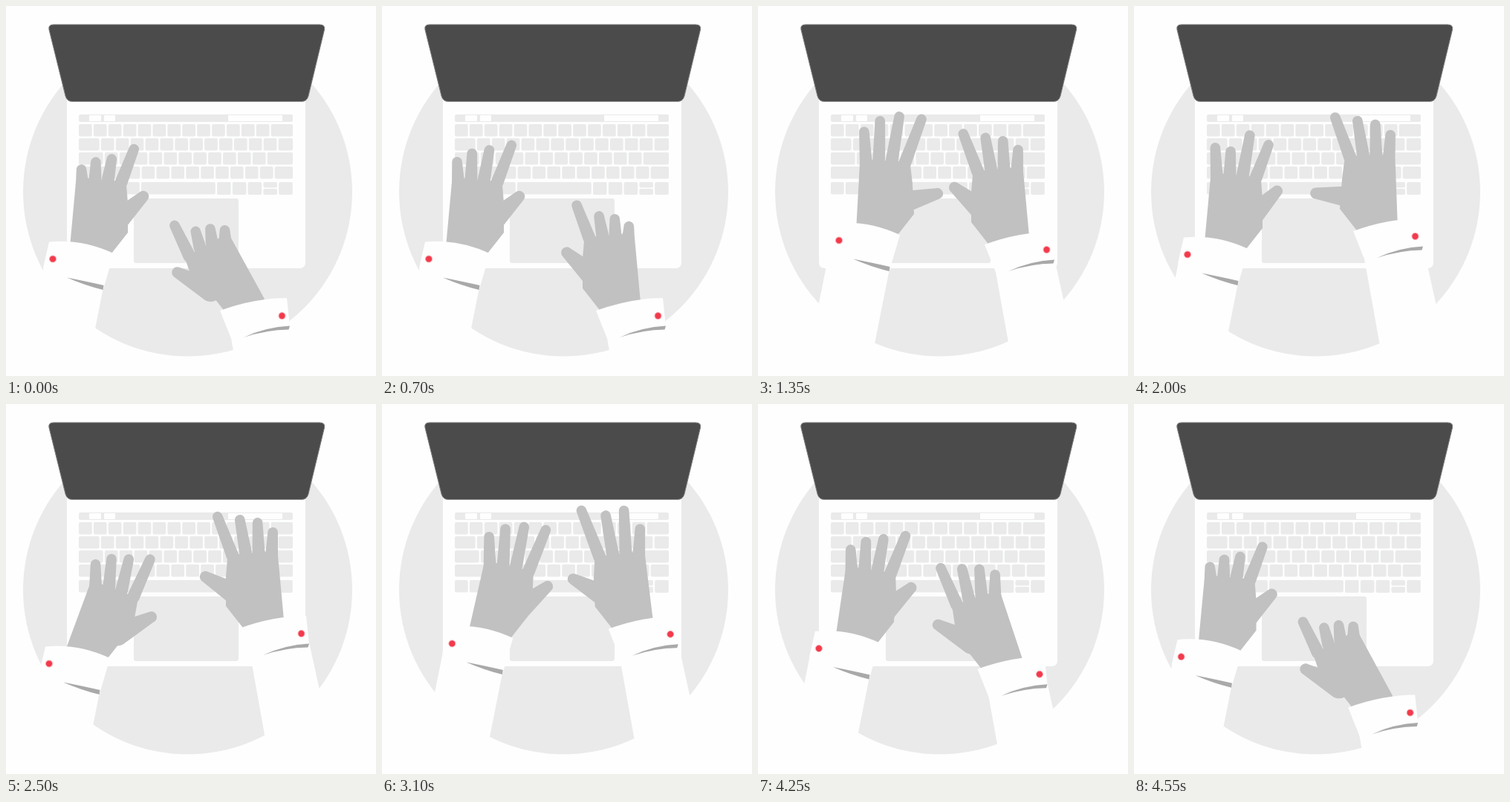
These frames come from a looping animation (498x498 px, 4.6 s). An HTML page:

```html
<!DOCTYPE html>
<html lang="en">
<head>
<meta charset="utf-8">
<title>Typing hands</title>
<style>
  html, body { margin: 0; width: 100%; height: 100%; overflow: hidden; background: #fdfefc; }
  svg { display: block; width: 100vw; height: 100vh; }
  .paper { fill: #fdfefd; }
  .grey { fill: #eaeaeb; }
  .skin { fill: #c1c1c1; }
  .shade { fill: #a9a9a9; }
  .button { fill: #f23a4c; stroke: #f9a9b1; stroke-width: 1; }
</style>
</head>
<body>
<svg viewBox="0 0 498 498">
  <rect class="paper" width="498" height="498"/>
  <circle class="grey" cx="244.5" cy="250" r="221.5"/>
  <path class="paper" d="M82 126H403V345Q403 353 395 353H90Q82 353 82 345Z"/>
  <path d="M64 25H422Q430 25 428.500 32L407 121Q405 128.500 398 128.500H89Q82 128.500 80 121L58 32Q56.500 25 64 25Z" fill="#4b4b4b" stroke="#7d7d7d" stroke-width="1"/>
  <g id="keys" class="grey"></g>
  <g class="paper">
    <rect x="112" y="147" width="16" height="8" rx="1"/>
    <rect x="132" y="147" width="15" height="8" rx="1"/>
    <rect x="299" y="147" width="73" height="8" rx="1"/>
  </g>
  <rect class="grey" x="172" y="259" width="141" height="87" rx="3"/>
  <g id="left">
    <g class="skin" transform="translate(114 325)"><path/><path/></g>
    <path class="paper" d="M51 350L131 379L83 620H-3Z"/>
    <path class="paper" d="M58 317.500Q102 313 145 333L131 381Q105 372 82 365L50 352Z"/>
    <path class="shade" d="M82 365.500Q110 371 131.500 376L130.500 382Q106 376 82 365.500Z"/>
    <circle class="button" cx="63" cy="340.500" r="4.500"/>
  </g>
  <g id="right">
    <g class="skin" transform="translate(320 400) scale(-1 1)"><path/><path/></g>
    <path class="paper" d="M303 447L382 429L424 620H334Z"/>
    <path class="paper" d="M288 410Q335 393 378 393L382 431Q340 434 304 450Z"/>
    <path class="shade" d="M320 446Q350 432 382 430.500L380.500 435.500Q350 436 320 446Z"/>
    <circle class="button" cx="371.500" cy="417" r="4.500"/>
  </g>
</svg>
<script>
const LOOP = 4600, TYPE_FROM = 1350, TYPE_TO = 3900;
const $ = s => document.querySelector(s);

// Keyboard: staggered rows, the last key fills each row
const PITCH = 19.9, LEFT = 98, RIGHT = 386;
let keys = '';
const key = (x, y, w, h = 16.5) =>
  keys += `<rect x="${x}" y="${y}" width="${w - 2.2}" height="${h}" rx="2"/>`;
key(LEFT, 146, RIGHT - LEFT + 2.2, 10);
[1, 1.5, 1.75, 2.25].forEach((first, row) => {
  const y = 159 + row * 19;
  let x = LEFT, w = first * PITCH;
  while (x + w + PITCH < RIGHT + 1) {
    key(x, y, w);
    x += w;
    w = PITCH;
  }
  key(x, y, RIGHT + 2.2 - x);
});
for (let i = 0; i < 3; i++) key(LEFT + i * PITCH, 237, PITCH);
key(158, 237, 24);
key(182, 237, 102);
for (let i = 0; i < 5; i++) {
  const x = 284 + i * 20.8;
  if (i === 3) { key(x, 237, 20.8, 7.5); key(x, 246, 20.8, 8); }
  else key(x, 237, 20.8, 17);
}
$('#keys').innerHTML = keys;

// Key poses: time, arm x, arm y, palm turn, finger reach, thumb angle.
// Hand shapes are relative to the wrist; the right hand is mirrored.
const hand = (id, beat, rest, lift, moves) => {
  const settled = moves[moves.length - 1];
  return {
    node: $(id), skin: $(id + ' .skin').children, beat,
    poses: [[0, ...rest], [700, ...lift], ...moves,
      [TYPE_TO, ...settled.slice(1)], [LOOP, ...rest]]
  };
};
const hands = [
  hand('#left', 400, [0, 0, 0, 0.38, 47], [0, 0, 0, 0.6, 47], [
    [1350, 46, -25, -2, 0.95, 76],
    [2000, 9, -6, 0, 0.7, 45],
    [2500, -5, 9, 15, 0.67, 63],
    [3300, 38, -23, 6, 0.9, 49]
  ]),
  hand('#right', 250, [0, 0, 24, 0.3, 62], [0, 0, 0, 0.35, 48], [
    [1350, 17, -89, 0, 0.65, 50],
    [2000, 7, -107, -3, 0.72, 84],
    [2500, 26, -108, 0, 0.7, 60],
    [3300, 15, -107, 2, 0.97, 62]
  ])
];
const PALM = [[-20, -88], [-11, -94], [41, -89], [48, -84], [50, -60]];
const WRIST = [[50, -20], [28, 8], [22, 29], [-31, 15], [-27.5, -6.5]];

const rad = deg => deg * Math.PI / 180;
const smooth = f => f * f * (3 - 2 * f);
const pt = (x, y) => x.toFixed(2) + ' ' + y.toFixed(2);
const turn = ([x, y], deg) => {
  const c = Math.cos(rad(deg)), s = Math.sin(rad(deg));
  return [x * c - y * s, x * s + y * c];
};

function poseAt(poses, t) {
  const i = poses.findIndex(p => p[0] > t);
  const a = poses[i - 1], b = poses[i];
  const e = smooth((t - a[0]) / (b[0] - a[0]));
  return a.map((v, k) => v + (b[k] - v) * e).slice(1);
}

// Rounded finger from its base, narrow at the tip; 0 degrees points up
function finger([x, y], angle, len, tipR, baseR) {
  const at = (dx, dy) => {
    const [px, py] = turn([dx, dy], angle);
    return pt(x + px, y + py);
  };
  return `M${at(-baseR, 0)}L${at(-tipR, -len)}A${tipR} ${tipR} 0 0 1 ${at(tipR, -len)}` +
    `L${at(baseR, 0)}A${baseR} ${baseR} 0 0 1 ${at(-baseR, 0)}Z`;
}

function drawHand({ node, skin, beat, poses }, t) {
  const [x, y, palm, reach, thumb] = poseAt(poses, t);
  const typing = Math.min(1, Math.max(0, (t - TYPE_FROM) / (TYPE_TO - TYPE_FROM)));
  const tap = 12 * Math.sin(Math.PI * typing) * Math.sin(2 * Math.PI * (t - 2500) / beat);

  // Fingers 0 to 3 run from little to index; neighbours tap in turn.
  let d = finger(turn([33.5, -34], palm), thumb, 51, 7.5, 15.5);
  for (let i = 0; i < 4; i++) {
    const knuckle = turn([-11.5 + 17.5 * i, -92.5 + 2.2 * (i - 1.5) ** 2], palm);
    const straight = reach + (1 - reach) * (i === 3 ? 0.6 : 0.05 * i);
    const len = (64 - 2 * (3 - i) ** 2) * straight + (i % 2 ? tap : -tap);
    d += finger(knuckle, -3 + 3.5 * i + 1.5 * i * i + palm * 0.2, len, 6.8, 8.5);
  }
  const outline = [...PALM.map(p => turn(p, palm)), ...WRIST];
  skin[0].setAttribute('d', 'M' + outline.map(p => pt(...p)).join('L') + 'Z');
  skin[1].setAttribute('d', d);
  node.setAttribute('transform', `translate(${pt(x, y)})`);
}

const start = performance.now();
function frame(now) {
  const t = Math.max(0, now - start) % LOOP;
  for (const h of hands) drawHand(h, t);
  requestAnimationFrame(frame);
}
frame(start);
</script>
</body>
</html>
```
